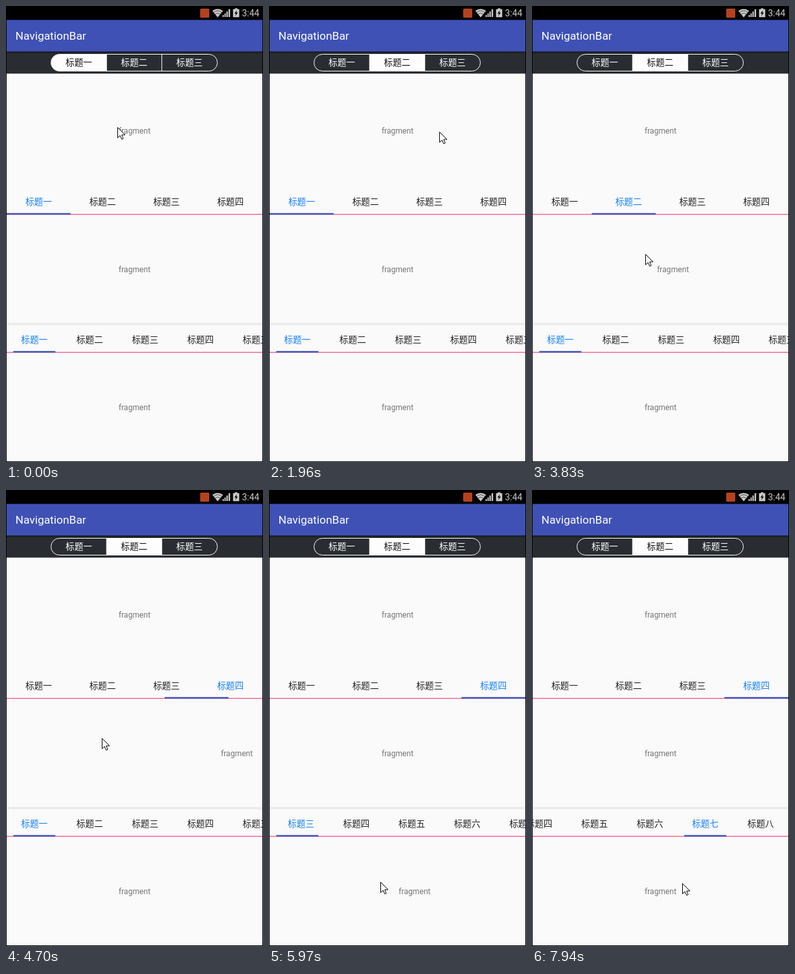
These frames come from a looping animation (397x704 px, 8000 ms). An HTML page:

```html
<!DOCTYPE html>
<html lang="zh">
<head>
<meta charset="utf-8">
<title>NavigationBar</title>
<style>
  html, body { margin: 0; width: 100%; height: 100%; overflow: hidden; background: #000; }
  svg { display: block; width: 100vw; height: 100vh; }
  text { font-family: Roboto, "Noto Sans CJK SC", "Noto Sans CJK", sans-serif; }
  .body { font-size: 12.15px; fill: #757575; text-anchor: middle; }
  .tab { font-size: 13.65px; fill: #222; text-anchor: middle; }
  .tab.on { fill: #1580ff; }
  .seg { fill: #fff; }
  .seg.on { fill: #111; }
</style>
</head>
<body>
<svg viewBox="0 0 397 704">
  <defs>
    <clipPath id="screen"><rect x="1" y="21" width="395" height="682"/></clipPath>
    <clipPath id="pill"><rect x="69.5" y="74.5" width="257" height="26" rx="13"/></clipPath>
    <linearGradient id="shade" x2="0" y2="1">
      <stop stop-opacity=".45"/><stop offset="1" stop-opacity="0"/>
    </linearGradient>
  </defs>

  <rect width="397" height="704"/>
  <g fill="#c9c9c9">
    <rect x="300" y="4" width="14" height="14" rx="1.5" fill="#b5421f"/>
    <path d="M327 17.5L318.8 7.6Q327 1.2 335.2 7.6Z"/>
    <path d="M321 9.6Q327 5 333 9.6M323.3 12.4Q327 9.5 330.7 12.4" fill="none" stroke="#000" stroke-width=".6"/>
    <path d="M334.5 14h2v3h-2zM337.5 11.5h2v5.5h-2zM340.5 8.5h2.2v8.5h-2.2zM343.8 5h2.4v12h-2.4z"/>
    <path d="M353.5 3.5h4V5h2.8v12.2h-9.6V5h2.8z"/>
    <path d="M356.8 6.5l-4 5h2.4l-1 4 4-5.2h-2.5z" fill="#000"/>
    <text x="364.5" y="16" font-size="13.9">3:44</text>
  </g>

  <g clip-path="url(#screen)">
    <rect y="104" width="397" height="600" fill="#fafafa"/>
    <rect y="70" width="397" height="34.4" fill="#292d31"/>
    <rect y="21.5" width="397" height="48.7" fill="#3f51b5"/>
    <rect y="70.2" width="397" height="4" fill="url(#shade)"/>
    <text x="14.5" y="52" font-size="17.4" fill="#fff">NavigationBar</text>
    <g clip-path="url(#pill)"><rect id="pick" y="74" width="85.5" height="27" fill="#fdfdfd"/></g>
    <path d="M155.3 75V100M240.7 75V100" stroke="#fff"/>
    <rect x="69.5" y="74.5" width="257" height="26" rx="13" fill="none" stroke="#fff"/>
    <rect y="489.3" width="397" height="3.4" fill="#ebebeb"/>
    <g id="view"></g>
  </g>
  <path id="cursor" d="M.5 .5V16.5L4.2 13L6.8 18.7L9.2 17.7L6.8 12H12Z" fill="#fff" stroke="#000"/>
</svg>

<script>
const LOOP = 8000, WIDTH = 395, LEFT = 1;
const DRAG = 95, SETTLE = 300, TAP = 200;     // ms
const GRIP = .425, PULL = WIDTH * GRIP;       // share of a page dragged by hand
const HOLD = 25, TRAVEL = 400;                // cursor pause and longest trip, ms
const NAMES = [...'一二三四五六七八'].map(n => '标题' + n);
const view = document.getElementById('view');
const pick = document.getElementById('pick');
const cursor = document.getElementById('cursor');

const smooth = u => u * u * (3 - 2 * u);
const clamp = u => Math.min(1, Math.max(0, u));
const shift = (el, x, y = 0) => el.setAttribute('transform', `translate(${x} ${y})`);

function add(parent, tag, attrs, label) {
  const el = document.createElementNS('http://www.w3.org/2000/svg', tag);
  for (const k in attrs) el.setAttribute(k, attrs[k]);
  if (label) el.textContent = label;
  return parent.appendChild(el);
}

// grab: where the hand takes hold of a page; lag: ms the indicator trails it
const top3 = { count: 3, pitch: 85.5, start: 69.8, tabY: 92, bodyY: 197, kind: 'tab seg', grab: [270, 200] };
const mid4 = { count: 4, pitch: WIDTH / 4, start: LEFT, tabY: 306.5, bodyY: 411, kind: 'tab', grab: [316, 383],
  lineY: 321, inset: 0, lag: 16 };
const low8 = { count: 8, pitch: 85.55, start: LEFT, tabY: 519.7, bodyY: 624, kind: 'tab', grab: [316, 605],
  lineY: 534, inset: 10.3, lag: 0 };
const pagers = [top3, mid4, low8];

for (const p of pagers) {
  p.moves = [];
  p.page = 0;
  p.pages = add(view, 'g');
  for (let i = 0; i < p.count; i++)
    add(p.pages, 'text', { class: 'body', x: 198.6 + i * WIDTH, y: p.bodyY }, 'fragment');
  if (p.lineY) add(view, 'rect', { x: 0, y: p.lineY, width: 397, height: 1.3, fill: '#f4578c' });
  p.bar = add(view, 'g');
  p.tabs = NAMES.slice(0, p.count).map((name, i) =>
    add(p.bar, 'text', { class: p.kind, x: p.start + (i + .5) * p.pitch, y: p.tabY }, name));
  if (p.lineY) p.mark = add(p.bar, 'rect', {
    y: p.lineY - 1.3, width: p.pitch - 2 * p.inset, height: 2.4, fill: '#3f51b5' });
}

const stops = [];
const rest = (t, x, y) => stops.push({ t, x, y });

function move(p, press, release, step, grip, settle) {
  const from = p.page;
  p.page += step;
  p.moves.push({ press, release, from, to: p.page, held: from + step * grip, settle });
}

function swipe(p, release, step = 1) {
  const press = release - DRAG, [x, y] = p.grab, ends = [x, x - PULL];
  if (step < 0) ends.reverse();
  move(p, press, release, step, GRIP, SETTLE);
  rest(press, ends[0], y);
  rest(release, ends[1], y);
  rest(release + HOLD, ends[1], y);
}

function tap(p, t, step, x) {
  move(p, t, t, step, 0, TAP);
  rest(t - 170, x, 87);
  rest(t + 20, x, 87);
}

// The session, in order of time
rest(0, 172, 187);
rest(680, 172, 187);
rest(930, 258, 190);
swipe(top3, 1209);
swipe(top3, 1490);
swipe(top3, 1720, -1);
rest(2000, 262, 194);
tap(top3, 2645, -1, 123);
tap(top3, 3025, 1, 187);
for (let i = 0; i < 3; i++) swipe(mid4, 3714 + i * 483);
for (let i = 0; i < 4; i++) swipe(low8, 5407 + i * 459);
rest(6905, 343, 607);
swipe(low8, 7090);
swipe(low8, 7470);
rest(7780, 326, 603);
rest(7900, 326, 603);
rest(7930, 232, 607);
rest(LOOP, 232, 607);

function pageAt(p, t) {
  const m = p.moves.filter(m => m.press <= t).pop();
  if (!m) return 0;
  if (t < m.release) return m.from + (m.held - m.from) * smooth((t - m.press) / (m.release - m.press));
  return m.to + (m.held - m.to) * (1 - clamp((t - m.release) / m.settle)) ** 5;
}

function chosenAt(p, t) {
  const m = p.moves.filter(m => m.release <= t).pop();
  return m ? m.to : 0;
}

function cursorAt(t) {
  const i = stops.findIndex(s => s.t > t), a = stops[i - 1], b = stops[i];
  const u = smooth(clamp((t - a.t) / Math.min(TRAVEL, b.t - a.t)));
  return [a.x + (b.x - a.x) * u, a.y + (b.y - a.y) * u].map(Math.round);
}

function draw(t) {
  for (const p of pagers) {
    const chosen = chosenAt(p, t);
    shift(p.pages, -pageAt(p, t) * WIDTH);
    p.tabs.forEach((tab, i) => tab.classList.toggle('on', i === chosen));
    if (!p.mark) {
      pick.setAttribute('x', p.start + chosen * p.pitch);
      continue;
    }
    const along = pageAt(p, t - p.lag) * p.pitch;
    shift(p.bar, -Math.min(along, p.count * p.pitch - WIDTH));
    p.mark.setAttribute('x', p.start + p.inset + along);
  }
  shift(cursor, ...cursorAt(t));
}

function tick() {
  draw(performance.now() % LOOP);
  requestAnimationFrame(tick);
}
tick();
</script>
</body>
</html>
```
